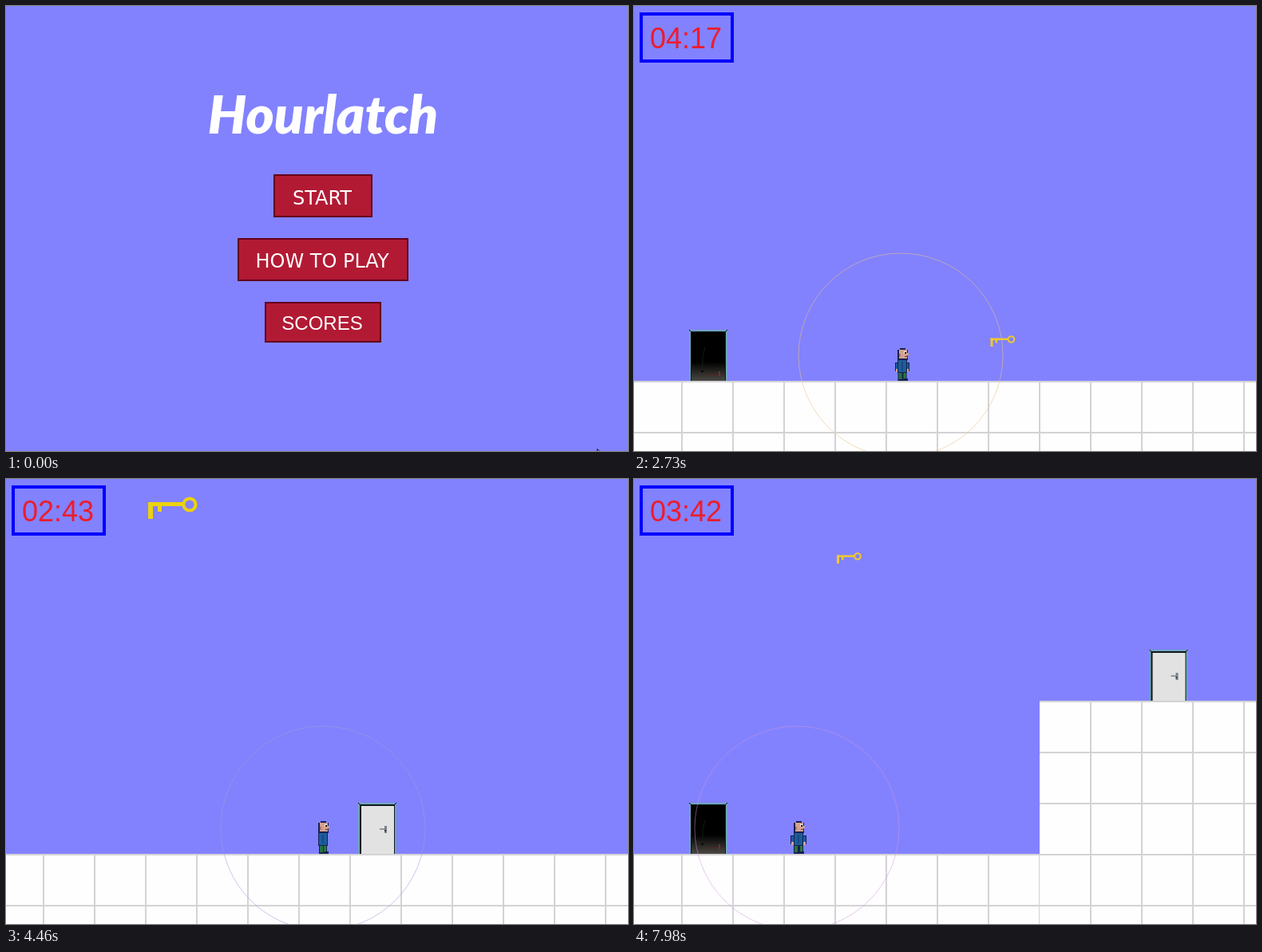
Recreate the animation shown at these times as an HTML page with a canvas. Size 779 by 558 pixels, loop 8000 ms.

```html
<!DOCTYPE html>
<html lang="en">
<head>
<meta charset="utf-8">
<title>Hourlatch</title>
<style>
html, body { margin: 0; width: 100%; height: 100%; overflow: hidden; background: #8282ff; }
canvas { display: block; }
</style>
</head>
<body>
<canvas id="stage" width="779" height="558"></canvas>
<script>
const LOOP = 8000, STEP = 66.5, TILE = 64;
const W = 779, H = 558, FLOOR = 470, CENTER = 397;
const GOLD = '#ecd20c';
const ctx = document.getElementById('stage').getContext('2d');

// Ground blocks are [left, top, right] in world pixels.
const LEVELS = [
  { from: 460, ground: [[-4, 470, 1980]], exit: [902, 406], key: [446.5, 413], pickup: 3080,
    x: t => Math.max(88, 116 + 0.3015 * (t - 2000)),
    clock: t => Math.min(5, 5 - (t - 1900) * 0.001005) },
  { from: 4720, ground: [[-4, 470, 636]], exit: [197.5, 406], key: [574, 413], pickup: 6450,
    x: t => t < 6560 ? Math.max(88, 314 + 0.3043 * (t - 5590)) : Math.max(222, 610 - 0.46 * (t - 6560)),
    clock: t => Math.min(3, 2.18 - (t - 5590) * 0.00102),
    left: t => t >= 6560 },
  { from: 7400, ground: [[-4, 470, 508], [508, 278, 1980]], exit: [645.5, 214], key: [254, 92], pickup: Infinity,
    x: t => Math.max(88, 206 + 0.3 * (t - 7980)),
    clock: t => Math.min(4, 4 - (t - 7400) / 1000) }
];

const POINTER = [[0, 740, 555], [70, 702, 505], [130, 622, 400], [200, 500, 290], [270, 448, 238]];

// Ring tint over time: [ms, r, g, b, alpha]
const RING = [
  [460, 240, 150, 215, .5], [2000, 240, 150, 215, .5], [3330, 222, 230, 60, .6],
  [4460, 160, 155, 212, .55], [5590, 160, 155, 212, .55], [6520, 215, 228, 70, .6],
  [7980, 205, 150, 215, .5]
];

function rect(color, x, y, w, h) {
  ctx.fillStyle = color;
  ctx.fillRect(x, y, w, h);
}

function text(str, x, y, font, color, align = 'left') {
  ctx.font = font;
  ctx.fillStyle = color;
  ctx.textAlign = align;
  ctx.fillText(str, x, y);
}

function line(color, width, ...pts) {
  ctx.strokeStyle = color;
  ctx.lineWidth = width;
  ctx.beginPath();
  pts.forEach(([x, y]) => ctx.lineTo(x, y));
  ctx.stroke();
}

function at(x, y, scale, draw) {
  ctx.save();
  ctx.translate(x, y);
  ctx.scale(scale, Math.abs(scale));
  draw();
  ctx.restore();
}

function tint(t) {
  let i = 1;
  while (i < RING.length - 1 && RING[i][0] < t) i++;
  const a = RING[i - 1], b = RING[i];
  const p = Math.min(1, Math.max(0, (t - a[0]) / (b[0] - a[0])));
  return `rgba(${a.slice(1).map((v, k) => v + (b[k + 1] - v) * p).join()})`;
}

function button(label, x, y, w, h, baseline, font, fill = '#b21a34') {
  rect('#64001c', x, y, w, h);
  rect(fill, x + 2, y + 2, w - 4, h - 4);
  text(label, x + w / 2 - 1, baseline, font, '#fff', 'center');
}

function pointer(x, y) {
  ctx.beginPath();
  [[0, 0], [0, 16], [4, 12.5], [7, 19], [9.5, 18], [6.7, 11.7], [11.5, 11.7]]
    .forEach(([px, py]) => ctx.lineTo(x + px, y + py));
  ctx.closePath();
  ctx.fillStyle = '#fff';
  ctx.fill();
  ctx.strokeStyle = '#000';
  ctx.lineWidth = 1;
  ctx.stroke();
}

function menu(t) {
  const verdanaLike = '24px "DejaVu Sans", sans-serif';
  text('Hourlatch', CENTER, 160, 'italic 900 67px Lato, cursive', '#fff', 'center');
  button('START', 335, 211, 124, 54, 249, verdanaLike, t >= 270 ? '#c92e48' : undefined);
  button('HOW TO PLAY', 290, 291, 214, 54, 328, verdanaLike);
  button('SCORES', 324, 371, 146, 51, 406, '24px "Liberation Sans", Arial, sans-serif');
  const [, x, y] = POINTER.filter(p => p[0] <= t).pop();
  pointer(x + .5, y + .5);
}

function ground([left, top, right]) {
  ctx.save();
  ctx.beginPath();
  ctx.rect(left, top, right - left + 1, H - top);
  ctx.clip();
  rect('#fefefe', left, top, right - left + 1, H - top);
  for (let x = left + TILE; x <= right; x += TILE) rect('#d3d3d6', x - 1, top, 2, H - top);
  for (let y = top; y < H; y += TILE) rect('#d3d3d6', left, y, right - left + 1, 2);
  ctx.restore();
}

function doorFrame() {
  rect('#6ea5bd', 0, 0, 48, 64);
  rect('#10181c', 2, 2, 44, 62);
  line('#000', 1, [0, 0], [4, 4]);
  line('#000', 1, [48, 0], [44, 4]);
}

function openDoor() {
  doorFrame();
  const shade = ctx.createLinearGradient(0, 40, 0, 64);
  shade.addColorStop(0, '#000');
  shade.addColorStop(1, '#4b4843');
  rect(shade, 3, 3, 42, 61);
  line('#191919', 1, [20, 22], [17, 34], [17, 52]);
  rect('#080808', 15, 51, 3, 2);
  rect('#5b2621', 22, 56, 18, 1);
  rect('#6b302b', 37, 52, 2, 6);
}

function closedDoor() {
  doorFrame();
  rect('#e2e2e2', 4, 4, 41, 60);
  rect('#8f989e', 27, 32, 8, 2);
  rect('#78838a', 33, 29, 3, 9);
  rect('#343c40', 33, 34, 2, 2);
}

// Drawn at icon size; the collectable is the same shape at half scale.
function key(color) {
  rect(color, 0, 7, 44, 5);
  rect(color, 0, 7, 6, 21);
  rect(color, 12, 10, 5, 9);
  ctx.strokeStyle = color;
  ctx.lineWidth = 4;
  ctx.beginPath();
  ctx.arc(52, 10, 7.6, 0, Math.PI * 2);
  ctx.stroke();
}

// Feet at the local origin, facing right; swing 0..1 opens arms and legs.
function player(swing) {
  const navy = '#17204f', skin = '#d5a18f', coat = '#1d5c9c';
  const arm = Math.round(swing * 4), leg = Math.round(swing * 2);

  rect(navy, -5 - leg / 2, -12, 10 + leg, 12);
  rect('#257344', -4 - leg / 2, -11, 4, 9);
  rect('#2c7b3d', 1 + leg / 2, -11, 3, 9);
  rect(navy, 2, -3, 5, 3);

  rect(navy, -6 - arm, -23, 12 + 2 * arm, 11);
  rect(coat, -5 - arm, -22, 10 + 2 * arm, 7);
  rect(skin, -5 - arm, -15, 3, 4);
  rect(skin, 2 + arm, -15, 3, 4);
  rect(navy, -6, -27, 12, 17);
  rect(coat, -5, -26, 10, 15);
  rect('#184a82', -1, -24, 2, 11);

  rect(navy, -6, -39, 13, 13);
  rect(navy, -3, -41, 7, 2);
  rect(skin, -4, -39, 10, 11);
  rect(skin, 6, -35, 2, 3);
  rect('#a8776d', -4, -34, 2, 4);
  rect('#eee', 2, -37, 3, 3);
  rect('#111', 3, -36, 2, 2);
  rect('#723f40', 3, -31, 4, 1);
}

function hud(seconds, hasKey) {
  ctx.strokeStyle = '#0000ff';
  ctx.lineWidth = 4;
  ctx.strokeRect(9, 10, 114, 59);
  const hundredths = Math.round(Math.max(0, seconds) * 100);
  const pad = n => String(n).padStart(2, '0');
  text(`${pad(Math.floor(hundredths / 100))}:${pad(hundredths % 100)}`,
    20, 53, '36px "Liberation Sans", Arial, sans-serif', '#ed1c2c');
  if (hasKey) at(178, 22, 1, () => key(GOLD));
}

function game(level, t) {
  const x = level.x(t), hasKey = t >= level.pickup;
  const scroll = level === LEVELS[0] ? Math.max(0, Math.round(x - CENTER)) : 0;
  const walking = Math.abs(level.x(t) - level.x(t - 10)) > .1;
  const swing = walking ? Math.abs(Math.sin(Math.PI * (t - 4460) / 460)) : 0;

  ctx.save();
  ctx.translate(-scroll, 0);
  level.ground.forEach(ground);
  at(69, 406, 1, openDoor);
  at(...level.exit, 1, closedDoor);
  if (!hasKey) at(...level.key, .5, () => key('#efc92c'));
  at(Math.round(x), FLOOR, level.left && level.left(t) ? -1 : 1, () => player(swing));
  ctx.restore();

  ctx.strokeStyle = tint(t);
  ctx.lineWidth = 1;
  ctx.beginPath();
  ctx.arc(scroll ? CENTER : x - 2, 438, 128, 0, Math.PI * 2);
  ctx.stroke();
  hud(level.clock(t), hasKey);
}

function draw(now) {
  const t = Math.ceil(Math.floor((now % LOOP) / STEP + .01) * STEP / 10) * 10;
  const level = LEVELS.filter(l => l.from <= t).pop();
  rect('#8282ff', 0, 0, W, H);
  if (level) game(level, t);
  else menu(t);
}

const start = performance.now();
function tick() {
  draw(performance.now() - start);
  requestAnimationFrame(tick);
}
tick();
</script>
</body>
</html>
```
